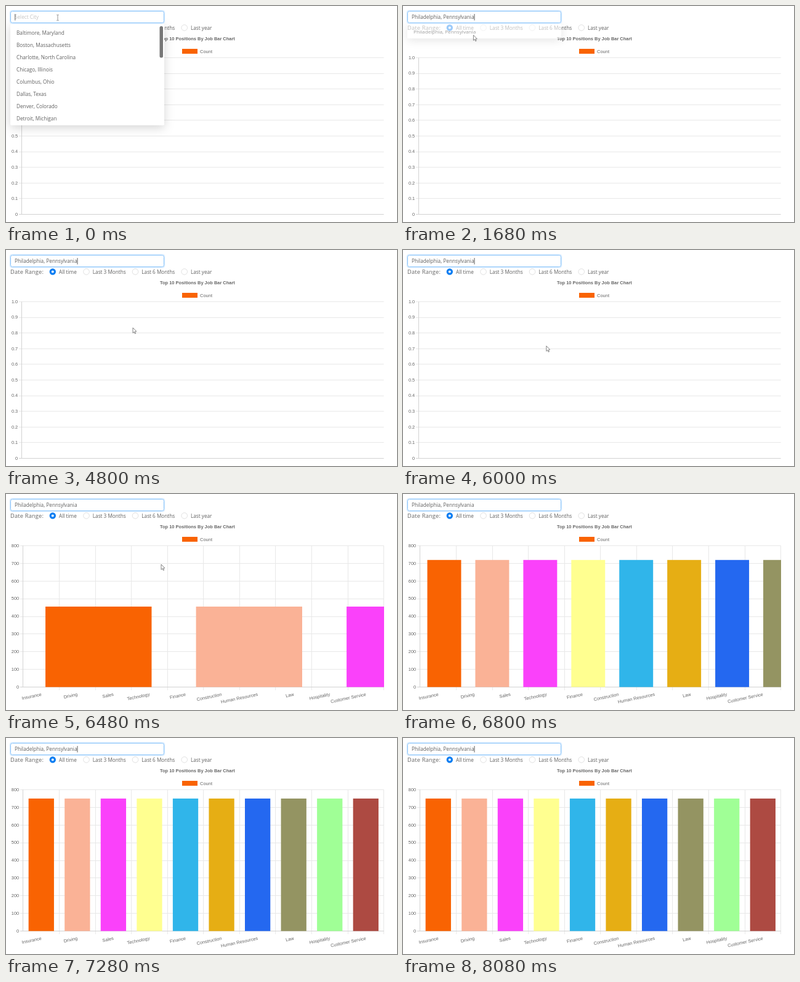
An HTML page for the animation above (8.16 s loop, 635 by 353 pixels).

```html
<!DOCTYPE html>
<html lang="en">
<head>
<meta charset="utf-8">
<title>Positions by job</title>
<style>
  html, body { margin: 0; width: 100%; height: 100%; overflow: hidden; background: #fff; }
  svg { display: block; width: 635px; height: 353px; }
  .ui { font: 8.22px "Open Sans", "Noto Sans", sans-serif; fill: #606060; }
  .chart { font: 7.4px "Liberation Sans", Arial, sans-serif; fill: #666; }
  .end { text-anchor: end; }
  .title { font-weight: bold; font-size: 7.45px; text-anchor: middle; }
  .grid { stroke: #e8e8e8; }
  .axis { stroke: #d2d2d2; }
  #list { filter: drop-shadow(0 4px 8px rgba(0, 0, 0, .17)); }
</style>
</head>
<body>
<svg id="stage" viewBox="0 0 635 353" xmlns="http://www.w3.org/2000/svg">
  <clipPath id="plot"><rect x="28" y="80" width="586" height="236"/></clipPath>
  <g id="radios">
    <text class="ui" x="7" y="38.8" style="font-size:9.3px;letter-spacing:.17px;fill:#666">Date Range:</text>
  </g>
  <text class="chart title" x="310.9" y="56">Top 10 Positions By Job Bar Chart</text>
  <rect x="286" y="70" width="25" height="8" fill="#f96302"/>
  <text class="chart" x="315" y="76.6" style="font-size:7.5px">Count</text>
  <g id="empty"></g>
  <g id="filled"><g id="bars" clip-path="url(#plot)"></g></g>

  <g id="list">
    <rect id="panel" x="7" y="29" width="250" rx="2" fill="#fff"/>
    <g id="items"></g>
    <rect id="thumb" x="249.5" y="33" width="5.5" height="51.5" rx="2.5" fill="#777"/>
  </g>

  <rect x="6.5" y="7.5" width="251" height="21" rx="3.5" fill="none" stroke="#e0f0ff" stroke-width="2"/>
  <rect x="7.5" y="8.5" width="249" height="19" rx="3" fill="#fff" stroke="#84c1fa"/>
  <text id="entry" class="ui" x="14" y="21.3"></text>
  <path id="caret" d="M0 13V23.5" stroke="#333" stroke-width=".8"/>

  <path id="beam" d="M-1.7-4.5H-.5L0-4L.5-4.5H1.7M0-4V4M-1.7 4.5H-.5L0 4L.5 4.5H1.7" fill="none" stroke="#777" stroke-width=".8"/>
  <path id="arrow" d="M0 0V8.6L2 6.8L3.4 9.9L4.7 9.3L3.3 6.3L5.9 6.1Z" fill="#fff" stroke="#666" stroke-width=".8"/>
</svg>
<script>
const LOOP = 8160, STEP = 80;
const CITY = "Philadelphia, Pennsylvania";
const CITIES = ["Baltimore, Maryland", "Boston, Massachusetts", "Charlotte, North Carolina",
  "Chicago, Illinois", "Columbus, Ohio", "Dallas, Texas", "Denver, Colorado", "Detroit, Michigan",
  CITY, "Phoenix, Arizona", "Portland, Oregon"];
const JOBS = ["Insurance", "Driving", "Sales", "Technology", "Finance", "Construction",
  "Human Resources", "Law", "Hospitality", "Customer Service"];
const COLORS = ["#f96302", "#fab296", "#fa41fa", "#ffff90", "#30b5ea", "#e6ae14",
  "#2468f0", "#949462", "#a0ff96", "#ad4a42"];
const TYPED = [[0, ""], [320, "P"], [480, "Ph"], [640, "Phi"], [1600, CITY]];
const PICK = 1600, FADE = 200;
const DATA = 6240, GROW = 6285, GROW_MS = 936, GONE = 6720;

// time, x, y of the pointer
const PATH = [[0, 84, 19], [960, 84, 19], [1360, 112, 42], [1600, 113, 43], [2000, 120, 66],
  [2640, 124, 60], [3200, 123.5, 57], [3280, 123.5, 57], [3520, 172, 110], [4000, 206, 127],
  [5300, 206, 127], [5760, 222, 170], [6160, 240, 148], [6480, 252, 115], [6640, 286, 5]];

const LEFT = 28, RIGHT = 613.6, TOP = 84.5, BASE = 315.5;
const SLOT = (RIGHT - LEFT) / JOBS.length, SLOT_START = 532;

const $ = id => document.getElementById(id);
const show = (el, on) => el.style.display = on ? "" : "none";

function add(parent, tag, attrs, text) {
  const el = document.createElementNS("http://www.w3.org/2000/svg", tag);
  for (const k in attrs) el.setAttribute(k, attrs[k]);
  if (text !== undefined) el.textContent = text;
  parent.append(el);
  return el;
}

function line(parent, cls, d) {
  add(parent, "path", { class: cls, d });
}

function scale(parent, x, base, count, label) {
  for (let i = 0; i <= count; i++) {
    const y = base - (base - TOP) * i / count;
    line(parent, i ? "grid" : "axis", `M${x - 5} ${Math.floor(y) + .5}H${RIGHT}`);
    add(parent, "text", { class: "chart end", x: x - 6.8, y: y + 2.3 }, label(i));
  }
  line(parent, "axis", `M${x - .5} ${TOP}V${base + .5}`);
}

function buildRadios() {
  const options = [["All time", 75.8], ["Last 3 Months", 130.5], ["Last 6 Months", 210], ["Last year", 289.7]];
  options.forEach(([label, cx], i) => {
    const ring = i ? { r: 4.8, stroke: "#d9d9d9", "stroke-width": .8 }
                   : { r: 3.6, stroke: "#0a7df2", "stroke-width": 3.2 };
    add($("radios"), "circle", { cx, cy: 35.5, fill: "#fff", ...ring });
    add($("radios"), "text", { class: "ui", x: cx + 10.3, y: 38.7 }, label);
  });
}

function buildChart() {
  scale($("empty"), 26, 340.5, 10, i => i ? (i / 10).toFixed(1) : "0");
  const grid = add($("filled"), "g", {});
  $("filled").prepend(grid);
  for (let i = 1; i <= JOBS.length; i++)
    line(grid, "grid", `M${Math.floor(LEFT + SLOT * i) + .5} ${TOP}V${BASE + 5}`);
  scale(grid, LEFT, BASE, 8, i => i * 100);
  JOBS.forEach((job, i) => {
    const x = LEFT + SLOT * (i + .5) + .8;
    add(grid, "text", { class: "chart end", transform: `translate(${x} 329.6) rotate(-12)` }, job);
  });
}

buildRadios();
buildChart();
const bars = COLORS.map(fill => add($("bars"), "rect", { fill }));

function drawBars(t) {
  const p = Math.min(1, Math.max(0, (t - GROW) / GROW_MS));
  const rest = (1 - p) ** 4;
  const slot = SLOT + (SLOT_START - SLOT) * rest;
  const w = slot * .705;
  const h = (BASE - TOP) * 750 / 800 * (1 - rest);
  bars.forEach((bar, i) => {
    bar.setAttribute("x", LEFT + slot * (i + .5) - w / 2);
    bar.setAttribute("y", BASE - h);
    bar.setAttribute("width", w);
    bar.setAttribute("height", h);
  });
}

let shownQuery = null;
function drawList(query) {
  if (query === shownQuery) return;
  shownQuery = query;
  const hits = CITIES.filter(c => c.startsWith(query)).slice(0, 8);
  $("items").replaceChildren();
  hits.forEach((c, i) => add($("items"), "text", { class: "ui", x: 17, y: 46.7 + 20 * i }, c));
  $("panel").setAttribute("height", hits.length * 20 + 6);
  show($("thumb"), !query);
}

function drawEntry(t) {
  const text = TYPED.filter(([at]) => at <= t).pop()[1];
  const entry = $("entry");
  entry.textContent = text || "Select City";
  entry.style.fill = text ? "" : "#c4c4c4";
  const x = text ? 14.5 + entry.getComputedTextLength() : 14.8;
  $("caret").setAttribute("transform", `translate(${x} 0)`);
  const phase = t < PICK ? t : t + 560;
  show($("caret"), phase % 1060 < 530 || (t > 300 && t < 1100));
  if (t < PICK) drawList(text);
}

function drawPointer(t) {
  let i = 1;
  while (i < PATH.length - 1 && PATH[i][0] < t) i++;
  const [t0, x0, y0] = PATH[i - 1], [t1, x1, y1] = PATH[i];
  const p = Math.min(1, (t - t0) / (t1 - t0));
  const x = x0 + (x1 - x0) * p, y = y0 + (y1 - y0) * p;
  const inField = y < 28 && t < PICK;
  for (const id of ["beam", "arrow"]) {
    $(id).setAttribute("transform", `translate(${x} ${y})`);
    show($(id), t < GONE && inField === (id === "beam"));
  }
}

function draw(t) {
  drawEntry(t);
  const closing = Math.max(0, (t - PICK) / FADE);
  show($("list"), closing < 1);
  $("list").style.opacity = 1 - closing;
  $("list").setAttribute("transform", `translate(0 ${29 * .2 * closing}) scale(1 ${1 - .2 * closing})`);
  show($("empty"), t < DATA);
  show($("filled"), t >= DATA);
  drawBars(t);
  drawPointer(t);
}

const start = performance.now();
function tick() {
  const t = (performance.now() - start) % LOOP;
  draw(Math.floor(t / STEP) * STEP);
  requestAnimationFrame(tick);
}
tick();
</script>
</body>
</html>
```
